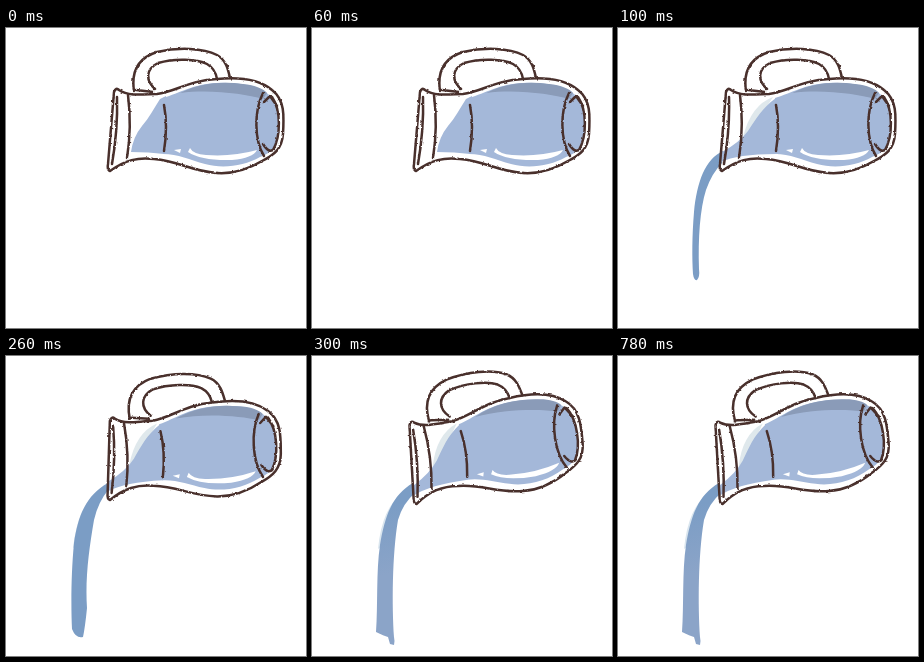
These frames come from a looping animation (300x300 px, 1.1 s). An HTML page:

```html
<!DOCTYPE html>
<html lang="en">
<head>
<meta charset="utf-8">
<title>Pouring jug</title>
<style>
  html, body { margin: 0; height: 100%; overflow: hidden; background: #fff; }
  svg { display: block; width: 100vw; height: 100vh; }
  .ink { fill: none; stroke: #49302c; stroke-width: 2.5; stroke-linecap: round; stroke-linejoin: round; }
</style>
</head>
<body>
<svg viewBox="0 0 300 300">
  <filter id="rough" filterUnits="userSpaceOnUse" x="0" y="0" width="300" height="300" color-interpolation-filters="sRGB">
    <feTurbulence type="fractalNoise" baseFrequency=".28" numOctaves="2" seed="4"/>
    <feDisplacementMap in="SourceGraphic" scale="2.4" xChannelSelector="R" yChannelSelector="G"/>
  </filter>
  <linearGradient id="settled" gradientUnits="userSpaceOnUse" x1="74" y1="150" x2="90" y2="215">
    <stop stop-color="#7b9dc5"/>
    <stop offset="1" stop-color="#8ba4c8"/>
  </linearGradient>
  <path id="mist" fill="#d9e5ee"/>
  <path id="stream"/>
  <g class="jug">
    <path id="wash" fill="#dfe8ec"/>
    <g fill="#a4b8d9">
      <path id="neck"/>
      <path d="M157 70 C174 65 187 56 211 55 C233 54 253 58 262 66 C271 73 274 86 273 103 C272 119 265 125 254 129 C238 138 217 141 199 136 C184 132 172 126 157 126 Z"/>
    </g>
    <path fill="#8a9bb8" d="M174 65 C194 55 216 53 237 56 C249 57 258 61 261 65 L257 71 C239 66 205 61 174 65 Z"/>
    <path fill="#fff" d="M184 120 Q187 126 200 127 Q226 129 251 122 Q247 130 226 132 Q196 133 182 124 Z M168 122 L175 121 L174 125 Z"/>
  </g>
  <g filter="url(#rough)">
    <g class="jug ink">
      <path d="M108 64 Q110 59 113 62 C123 69 140 66 151 66 C169 64 184 52 211 51 C232 49 253 51 266 62 C279 72 278 88 277 106 C276 121 268 127 256 133 C241 142 226 146 211 145 C183 143 174 133 148 131 C132 129 119 132 104 143 Q101 142 102 136 Q105 100 108 64"/>
      <path d="M111 69 Q112 102 106 136 M122 67 Q126 99 121 130 M158 77 Q162 98 158 123"/>
      <path d="M128 63 C125 43 132 30 151 24 C173 19 197 20 211 27 C220 32 222 41 224 50 M149 61 C139 52 140 41 152 35 C169 30 191 31 201 36 C208 40 210 45 211 51 M130 62 L147 64"/>
      <path d="M257 65 C248 83 248 112 258 128 M266 69 C275 82 275 108 267 122 M258 74 L264 68 L271 78 M257 116 Q263 126 268 121"/>
    </g>
  </g>
</svg>
<script>
  const LOOP = 1100, STEP = 100;
  const el = id => document.getElementById(id);
  const pouring = {
    neck: 'M158 70 C144 80 138 91 130 103 Q121 115 104 124 L103 134 Q119 126 158 126 Z',
    wash: 'M155 69 Q133 77 125 109 L139 94 Z'
  };
  const poses = [
    {
      jug: '',
      neck: 'M160 68 L154 71 C148 80 143 90 136 98 Q127 109 125 124 Q143 124 158 126 Z'
    },
    {
      ...pouring,
      jug: '', tint: '#7b9dc5',
      stream: 'M105 123 C87 131 79 154 76 184 C74 208 74 230 75 246 Q76 253 79 252 Q82 249 81 241 C80 210 82 181 88 162 Q94 145 104 135 Z'
    },
    {
      ...pouring,
      jug: 'translate(0 1) rotate(-3 104 143)', tint: '#7b9dc5',
      stream: 'M102 127 C80 139 72 160 68 187 C65 218 65 252 66 273 Q70 283 77 281 Q79 272 81 252 C79 223 83 193 88 164 Q92 146 103 133 Z',
      mist: 'M91 137 Q72 149 67 192 L71 190 L79 157 Z'
    },
    {
      ...pouring,
      jug: 'translate(.5 5) rotate(-8 104 143)', tint: 'url(#settled)',
      stream: 'M101 127 C80 139 73 160 68 189 C64 215 66 250 64 276 Q72 280 76 281 L78 288 L82 289 Q83 285 82 281 C80 250 80 199 86 164 Q91 147 103 137 Z',
      mist: 'M91 137 Q70 151 66 193 L70 190 L79 157 Z'
    }
  ];

  function draw(time) {
    const pose = poses[Math.min(3, Math.floor(time % LOOP / STEP))];
    for (const layer of document.querySelectorAll('.jug')) layer.setAttribute('transform', pose.jug);
    for (const part of ['neck', 'wash', 'stream', 'mist']) el(part).setAttribute('d', pose[part] || '');
    el('stream').setAttribute('fill', pose.tint || 'none');
  }

  const start = performance.now();
  function tick() {
    draw(performance.now() - start);
    requestAnimationFrame(tick);
  }
  tick();
</script>
</body>
</html>
```
